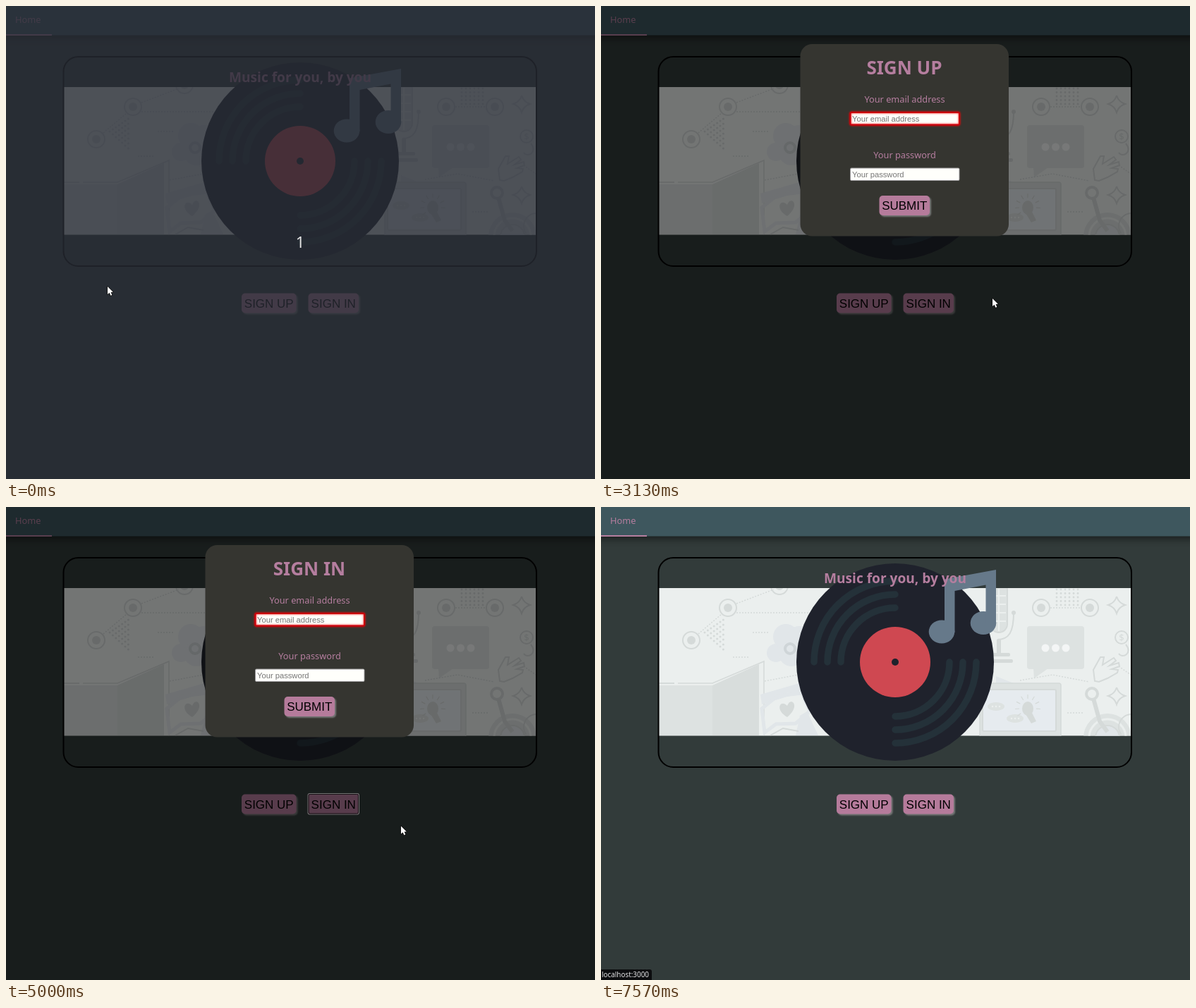
An HTML page with a canvas for the animation above (7.61 s loop, 835 px wide and 671 px high).

```html
<!DOCTYPE html>
<html lang="en">
<head>
<meta charset="utf-8">
<title>Music for you, by you</title>
<style>
  html, body { margin: 0; width: 100%; height: 100%; overflow: hidden; background: #323b3a; }
  canvas { display: block; }
</style>
</head>
<body>
<canvas id="stage" width="835" height="671"></canvas>
<script>
const W = 835, H = 671, LOOP = 7610;
const c = document.getElementById('stage').getContext('2d');
const TAU = Math.PI * 2;
const SANS = '"Noto Sans", "Open Sans", sans-serif';
const UI = '"Liberation Sans", Arial, sans-serif';
const PINK = '#b57e9f', DISC = '#1f222c', GROOVE = '#243139', SLATE = '#66798a';
const FAINT = '#dde2e1', LINE = '#d5dad9', COOL = '#e1e6e9', PAPER = '#ebefee';

const dialogs = [
  { title: 'SIGN UP', open: 1303, close: 3230 },
  { title: 'SIGN IN', open: 3970, close: 5710 }
];
const buttons = [
  { x: 334, w: 77.5, label: 'SIGN UP', focus: [1270, 3100] },
  { x: 428.5, w: 71.5, label: 'SIGN IN', focus: [3830, 5630] }
];
// Pointer moves: start, end, target x, target y
const moves = [
  [330, 330, 150, 405], [500, 1230, 345, 413], [2000, 2330, 342, 386],
  [2470, 3090, 555, 415], [3330, 3800, 474, 425], [4700, 5230, 617, 471],
  [5370, 5370, 618, 472], [5650, 5700, 619, 473], [5900, 6330, 558, 507],
  [6430, 6430, 415, 523], [6570, 7300, -9, 11]
];

// CSS "ease" curve, solved by bisection
function ease(x) {
  if (x <= 0) return 0;
  if (x >= 1) return 1;
  let lo = 0, hi = 1;
  for (let i = 0; i < 24; i++) {
    const s = (lo + hi) / 2, r = 1 - s;
    if (0.75 * r * s * (r + s) + s * s * s < x) lo = s; else hi = s;
  }
  const r = 1 - lo;
  return 0.3 * r * r * lo + 3 * r * lo * lo + lo ** 3;
}

function pointer(t) {
  let x = 144, y = 398;
  for (const [a, b, tx, ty] of moves) {
    if (t < a) break;
    const k = a === b ? 1 : Math.min(1, (t - a) / (b - a));
    const s = k * k * (3 - 2 * k);
    x += (tx - x) * s;
    y += (ty - y) * s;
  }
  return { x, y };
}

function paint(fill, stroke, width = 2) {
  if (fill) { c.fillStyle = fill; c.fill(); }
  if (stroke) { c.strokeStyle = stroke; c.lineWidth = width; c.stroke(); }
}
function rect(x, y, w, h, r, fill, stroke, width) {
  c.beginPath();
  c.roundRect(x, y, w, h, r);
  paint(fill, stroke, width);
}
function oval(x, y, rx, ry, fill, stroke, width) {
  c.beginPath();
  c.ellipse(x, y, rx, ry, 0, 0, TAU);
  paint(fill, stroke, width);
}
const dot = (x, y, r, fill, stroke, width) => oval(x, y, r, r, fill, stroke, width);
function poly(pts, fill, stroke, width, open) {
  c.beginPath();
  for (let i = 0; i < pts.length; i += 2) c.lineTo(pts[i], pts[i + 1]);
  if (!open) c.closePath();
  paint(fill, stroke, width);
}
function arc(x, y, r, a, b, stroke, width) {
  c.beginPath();
  c.arc(x, y, r, a, b);
  paint(null, stroke, width);
}
function dashes(...pts) {
  c.setLineDash([2, 2]);
  poly(pts, null, LINE, 1.5, true);
  c.setLineDash([]);
}
function text(str, x, y, font, color, align = 'center') {
  c.font = font;
  c.fillStyle = color;
  c.textAlign = align;
  c.fillText(str, x, y);
}

function ring(x, y) {
  dot(x, y, 12, null, LINE, 2);
  dot(x, y, 6, LINE);
}
function sparkle(x, y) {
  c.beginPath();
  c.moveTo(x, y - 12);
  for (let i = 1; i <= 4; i++) {
    const a = i * TAU / 4, m = a - TAU / 8;
    c.quadraticCurveTo(x + Math.sin(m) * 4, y - Math.cos(m) * 4, x + Math.sin(a) * 12, y - Math.cos(a) * 12);
  }
  paint(null, LINE, 2);
}

function leftDoodles() {
  dashes(138, 180, 171, 152);
  dashes(192, 137, 245, 117);
  dashes(192, 150, 300, 150);
  dashes(215, 178, 237, 178);
  dashes(187, 213, 209, 213);
  ring(180, 143);
  ring(128, 189);
  ring(253, 112);
  for (let i = 0; i < 7; i++)
    for (let j = 0; j <= i; j++) dot(147 + i * 4.4, 178 - i * 3 + j * 7, 1.5, LINE);
  // cloud and gear
  for (const [x, y, r] of [[248, 207, 13], [262, 184, 18], [281, 187, 18], [270, 208, 18]]) dot(x, y, r, COOL);
  dot(268, 201, 7, null, '#cfd5d8', 4);
  // open book
  poly([82, 253, 158, 253, 158, 324, 82, 324], FAINT);
  poly([158, 253, 224, 223, 224, 324, 158, 324], '#d8dddc');
  poly([82, 250, 104, 250], null, LINE, 2, true);
  poly([109, 250, 158, 250, 231, 219, 231, 324], null, LINE, 1.5, true);
  // heart bubble and stripes
  dashes(232, 247, 290, 236);
  poly([226, 266, 288, 248, 300, 258, 228, 280], COOL);
  poly([228, 286, 250, 268, 285, 264, 296, 290, 276, 307, 248, 308, 232, 320], null, COOL, 5);
  c.beginPath();
  c.moveTo(264, 298);
  c.bezierCurveTo(246, 288, 254, 272, 264, 282);
  c.bezierCurveTo(269, 268, 284, 282, 264, 298);
  paint(LINE);
  poly([276, 324, 282, 296, 292, 290, 308, 324], COOL);
  poly([240, 324, 258, 314, 280, 318], null, LINE, 2, true);
}

function rightDoodles() {
  // microphone
  rect(552, 106, 24, 72, 12, FAINT, LINE, 2);
  for (let y = 126; y < 170; y += 12) poly([554, y, 574, y], null, PAPER, 2, true);
  poly([564, 116, 564, 176], null, PAPER, 2, true);
  c.beginPath();
  c.moveTo(585, 150);
  c.bezierCurveTo(585, 178, 578, 188, 562, 188);
  paint(null, LINE, 2);
  dot(585, 150, 3, LINE);
  rect(561, 188, 6, 20, 0, LINE);
  rect(550, 207, 30, 5, 2, LINE);
  rect(548, 216, 36, 5, 2, LINE);
  // connected rings and dot grid
  dashes(637, 143, 681, 143);
  ring(624, 143);
  ring(693, 143);
  for (let i = 0; i < 6; i++)
    for (let j = 0; j < 5; j++) dot(646 + i * 6, 117 + j * 5.5, 1.4, LINE);
  // chat bubble
  rect(604, 169, 81, 61, 4, FAINT);
  poly([613, 229, 634, 229, 614, 243], FAINT);
  for (let i = 0; i < 3; i++) dot(630 + i * 14.5, 200, 5.5, '#f3f5f5');
  // plane and screen
  poly([560, 240, 590, 252, 589, 276, 577, 268, 560, 273], COOL);
  dashes(594, 246, 640, 238, 692, 248);
  rect(537, 250, 115, 82, 3, FAINT, LINE, 1.5);
  rect(541, 259, 104, 59, 2, '#e6ebef', LINE, 2);
  for (const [x, y] of [[560, 283], [587, 300]]) {
    oval(x, y, 12, 6, FAINT);
    for (let i = -1; i < 2; i++) dot(x + i * 5, y, 1.3, PAPER);
  }
  oval(605, 286, 8, 10, LINE);
  poly([602, 294, 611, 292, 617, 304, 610, 307], LINE);
  for (let i = 0; i < 8; i++) {
    const a = Math.PI * 0.8 + i * 0.55, s = Math.sin(a), k = Math.cos(a);
    poly([605 + k * 12, 285 + s * 13, 605 + k * 18, 285 + s * 19], null, LINE, 1.2, true);
  }
  dashes(661, 292, 684, 292);
  // hand and coin
  dot(738, 185, 9, null, LINE, 2);
  text('$', 738, 190, '13px ' + SANS, LINE);
  c.beginPath();
  c.moveTo(744, 195);
  c.bezierCurveTo(754, 207, 740, 216, 734, 208);
  paint(null, LINE, 2);
  poly([700, 247, 698, 231, 708, 213, 713, 213, 711, 224, 727, 214, 730, 218, 721, 225,
    734, 221, 735, 226, 724, 230, 733, 231, 732, 235, 718, 243, 706, 248], PAPER, LINE, 2);
  dashes(734, 226, 751, 238);
  sparkle(731, 139);
  sparkle(731, 268);
  // turntable
  dot(718, 327, 34, FAINT);
  dot(718, 327, 26, null, PAPER, 3);
  dot(718, 327, 17, COOL, LINE, 2);
  arc(752, 312, 18, Math.PI * 0.8, Math.PI * 1.5, LINE, 2);
  poly([697, 268, 707, 304, 718, 319], null, LINE, 6, true);
  dot(696, 265, 8, PAPER, LINE, 4);
}

function hero() {
  c.save();
  c.beginPath();
  c.rect(82, 115, 669.5, 209.5);
  c.clip();
  c.fillStyle = PAPER;
  c.fillRect(82, 115, 670, 210);
  leftDoodles();
  rightDoodles();
  c.restore();

  dot(417, 220, 140, DISC);
  c.lineCap = 'round';
  for (const r of [77, 96, 115]) {
    arc(417, 220, r, Math.PI, Math.PI * 1.5, GROOVE, 9.5);
    arc(417, 220, r, 0, Math.PI / 2, GROOVE, 9.5);
  }
  c.lineCap = 'butt';
  dot(417, 220, 50, '#cf4851');
  dot(417, 220, 5, DISC);

  oval(483, 177, 18.3, 16.5, SLATE);
  oval(542, 164.5, 18.3, 16.5, SLATE);
  poly([487, 102.5, 560, 89, 560, 165, 545.5, 165, 545.5, 110.5, 501.5, 119, 501.5, 178, 487, 178], SLATE);

  rect(81.5, 72, 670.5, 297, 21, null, '#000', 2);
  text('Music for you, by you', 417, 108, 'bold 19.1px ' + SANS, PINK);
}

function navBar() {
  c.save();
  c.shadowColor = 'rgba(0,0,0,.6)';
  c.shadowBlur = 12;
  c.shadowOffsetY = 2;
  c.fillStyle = '#3e575e';
  c.fillRect(-20, -20, W + 40, 61.5);
  c.restore();
  text('Home', 13, 24, '12.8px ' + SANS, PINK, 'left');
  c.fillStyle = PINK;
  c.fillRect(0, 40, 65, 2);
}

function button(x, y, w, label, hover, focus) {
  const fill = hover ? '#952d6d' : '#b57b9b';
  if (focus) {
    rect(x - 0.5, y - 0.5, w + 1, 29.5, 2, fill, '#f4f4f4', 1);
    rect(x + 0.5, y + 0.5, w - 1, 27.5, 2, null, '#241c22', 1);
  } else {
    c.save();
    c.shadowColor = '#777';
    c.shadowBlur = 2;
    c.shadowOffsetX = c.shadowOffsetY = 2;
    rect(x, y + 0.5, w, 28, 5, fill);
    c.restore();
  }
  text(label, x + w / 2, y + 20.5, '17px ' + UI, '#000');
}

function field(y, hint, invalid) {
  c.save();
  if (invalid) {
    c.shadowColor = '#f00';
    c.shadowBlur = 3;
  }
  rect(353.5, y + 0.5, 154.5, 17.5, 1.5, '#fffffb', invalid ? '#c8000a' : '#9b9a9c', invalid ? 2 : 1);
  c.restore();
  text(hint, 356, y + 13, '11.2px ' + UI, '#757575', 'left');
}

function dialog(title, lift) {
  c.save();
  c.translate(0, -lift);
  rect(282.5, 54, 295.5, 272.5, 17, '#353530');
  text(title, 430, 97, 'bold 26px ' + SANS, PINK);
  text('Your email address', 430.5, 136.5, '12.75px ' + SANS, PINK);
  field(150.5, 'Your email address', true);
  text('Your password', 430.5, 215.5, '12.75px ' + SANS, PINK);
  field(229.5, 'Your password', false);
  button(394.5, 268.5, 71.5, 'SUBMIT');
  c.restore();
}

function cursor({ x, y }, hand) {
  c.save();
  c.lineJoin = 'round';
  if (hand) {
    c.translate(x - 3, y);
    const shape = [2, 0, 4, 0, 4, 4, 9, 5, 10, 6, 10, 9, 8.5, 12.5, 3.5, 12.5, 0, 7.5, 0.5, 6.5, 2, 7.5];
    poly(shape, '#fff', '#222', 1);
  } else {
    c.translate(x, y);
    poly([0, 0, 0, 11, 2.6, 8.8, 4.4, 12.8, 6.3, 11.9, 4.6, 8, 7.8, 7.8], null, '#111', 1.6);
    c.fillStyle = '#fff';
    c.fill();
  }
  c.restore();
}

function shade(style) {
  c.fillStyle = style;
  c.fillRect(0, 0, W, H);
}

function draw(t) {
  const p = pointer(t);
  const modal = dialogs.some(d => t >= d.open && t < d.close);
  const over = b => !modal && p.x >= b.x && p.x <= b.x + b.w && p.y >= 407 && p.y <= 436;

  shade('#323b3a');
  navBar();
  hero();
  for (const b of buttons)
    button(b.x, 407, b.w, b.label, over(b), t >= b.focus[0] && t < b.focus[1]);

  if (modal) shade('rgba(0,0,0,.51)');
  for (const d of dialogs) {
    if (t < d.open || t > d.close + 300) continue;
    const shown = t < d.close ? ease((t - d.open) / 300) : 1 - ease((t - d.close) / 300);
    dialog(d.title, H * (1 - shown));
  }

  if (t >= 7270) {
    c.globalAlpha = t < 7570 ? 0.7 : 1;
    rect(-4, 656, 76, 19, 3, '#0b0c0e');
    text('localhost:3000', 1, 667, '9.9px ' + SANS, '#e4e4e6', 'left');
    c.globalAlpha = 1;
  }

  // Countdown veil
  if (t < 100) shade(`rgba(38,42,50,${t < 70 ? 0.8 : 0.4})`);
  if (t < 70) text('1', 417, 343, '22px ' + SANS, '#e6e6e6');

  const home = p.x < 65 && p.y < 41;
  if (t < 7300) cursor(p, home || buttons.some(over));
}

const start = performance.now();
function tick() {
  draw((performance.now() - start) % LOOP);
  requestAnimationFrame(tick);
}
tick();
</script>
</body>
</html>
```
